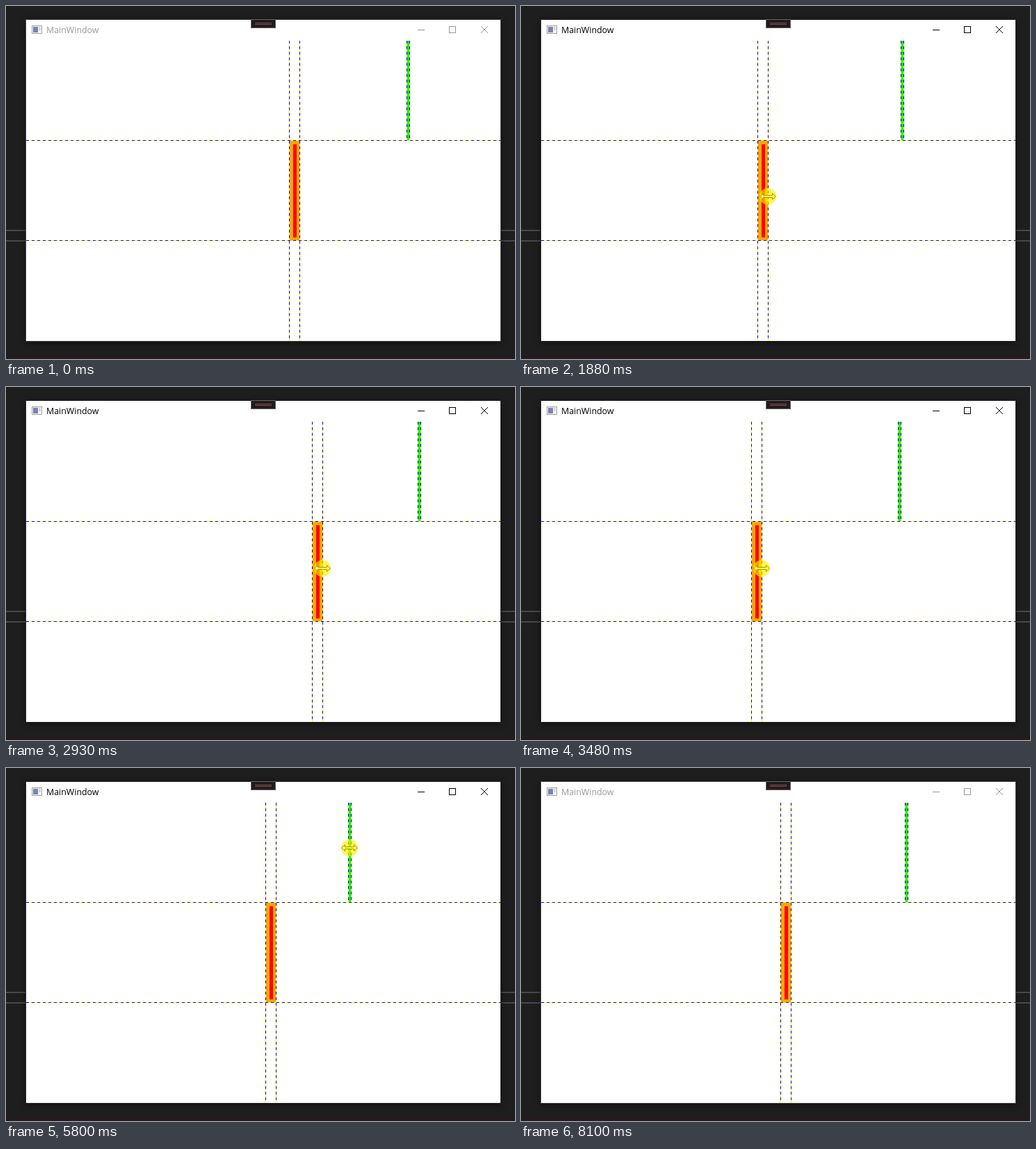
Write an HTML page that moves like this. It is 732x508 px and loops after 8.17 s.

```html
<!DOCTYPE html>
<html lang="en">
<head>
<meta charset="utf-8">
<title>Grid splitters</title>
<style>
  html, body { margin: 0; width: 100%; height: 100%; overflow: hidden; background: #1e1e1e; }
  svg { display: block; width: 732px; height: 508px; }
  .shadow { filter: drop-shadow(0 2px 5px rgba(0, 0, 0, .6)); }
  .title { font: 12.4px "Open Sans", "Noto Sans", sans-serif; }
  .chrome { --ink: #999; --border: #444; }
  .chrome.active { --ink: #000; --border: #262626; }
  .chrome text { fill: var(--ink); }
  .chrome path { stroke: var(--ink); fill: none; }
  .border { stroke: var(--border); fill: none; }
  .gap { stroke: #ff0; }
  .dash { stroke: #00f; stroke-dasharray: 4 4; }
</style>
</head>
<body>
<svg viewBox="0 0 732 508">
  <rect width="732" height="508" fill="#1e1e1e"/>
  <rect y="504" width="732" height="4" fill="#241a1f"/>
  <path d="M0 323H732M0 338H732" stroke="#484848" stroke-width="2"/>
  <rect class="shadow" x="29" y="20" width="682" height="462" fill="#fff"/>

  <g id="chrome" class="chrome">
    <rect class="border" x="28.5" y="19.5" width="683" height="463"/>
    <rect x="37.5" y="28.5" width="14" height="11" fill="#f4f4f4" stroke="#a0a0a0"/>
    <rect x="39" y="30" width="7" height="8" fill="#7d80b0"/>
    <rect x="47" y="30" width="3" height="5" fill="#d4d8e4"/>
    <text class="title" x="58" y="39">MainWindow</text>
    <path d="M592 34.5H602M637.5 29.5h9v9h-9z" shape-rendering="crispEdges"/>
    <path d="M683 29l10 10M693 29l-10 10"/>
  </g>
  <rect x="352.5" y="19.5" width="35" height="12" fill="#1f1b1d" stroke="#6b6468"/>
  <path d="M358 24.5H382M358 26.5H382" stroke="#8a4a4e"/>

  <g shape-rendering="crispEdges">
    <g id="green">
      <rect y="50" width="5" height="144" fill="#0f0"/>
      <path class="gap" d="M.5 50V194M4.5 50V194"/>
      <path class="dash" d="M.5 50V194M4.5 50V194"/>
    </g>
    <g id="red">
      <rect y="194" width="15" height="144" fill="#ffa500"/>
      <rect x="5" y="199" width="5" height="134" fill="#f00"/>
      <path class="gap" d="M-.5 50V482M14.5 50V482"/>
      <path class="dash" d="M-.5 50V482M14.5 50V482"/>
    </g>
    <path class="gap" d="M29 193.5H711M29 337.5H711"/>
    <path class="dash" d="M29 193.5H711M29 337.5H711"/>
  </g>

  <g id="cursor">
    <path id="arrow" d="M.5 .5V16.5L4.2 13L6.8 18.5L9.3 17.4L6.8 12H11.5Z" fill="#fff" stroke="#000"/>
    <path id="resize" d="M-11.5 0L-6.5 -4.5V-1.5H6.5V-4.5L11.5 0L6.5 4.5V1.5H-6.5V4.5Z" fill="#fff" stroke="#000"/>
    <circle id="press" r="12" fill="#fff000" fill-opacity=".65"/>
  </g>
</svg>
<script>
const LOOP = 8170, STEP = 70;
const RED_DRAG = [1670, 4220], GREEN_DRAG = [4960, 7280];
const GREEN_SHARE = .542;

// Pointer gestures: start, end, then the points reached at even intervals.
// Equal start and end make a jump.
let last;
const gestures = [
  [0, 0, [669, 495]],
  [130, 870, [386, 309], [422, 284]],
  [1070, 1070, [429, 282]],
  [1070, 1340, [422, 280]],
  [1670, 2230, [204, 260]],
  [2430, 2930, [455, 261]],
  [3130, 3890, [344, 261], [388, 261]],
  [4220, 4560, [563, 112]],
  [4960, 5230, [626, 113]],
  [5450, 6200, [480, 115], [520, 115], [554, 117]],
  [6270, 6550, [600, 118]],
  [6740, 6950, [554, 119]],
  [7280, 7770, [712, 515]]
].map(([start, end, ...stops]) => {
  const points = last ? [last, ...stops] : stops;
  last = stops.at(-1);
  return { start, end, points };
});

const $ = id => document.getElementById(id);
const [chrome, green, red, cursor, arrow, resize, press] =
  ["chrome", "green", "red", "cursor", "arrow", "resize", "press"].map($);

const show = (el, on) => el.setAttribute("visibility", on ? "visible" : "hidden");
const move = (el, x, y = 0) => el.setAttribute("transform", `translate(${x} ${y})`);
const within = (t, [from, to]) => t >= from && t < to;
const clamp = (t, [from, to]) => Math.min(to, Math.max(from, t));
const ease = k => (1 - Math.cos(Math.PI * k)) / 2;

function pointerAt(t) {
  const { start, end, points } = gestures.findLast(g => g.start <= t);
  if (t >= end) return points.at(-1);
  const elapsed = Math.floor((t - start) / STEP) * STEP;
  const progress = elapsed / (end - start) * (points.length - 1);
  const leg = Math.floor(progress), k = ease(progress - leg);
  const [a, b] = points.slice(leg);
  return a.map((v, axis) => Math.round(v + (b[axis] - v) * k));
}

const dragX = (t, drag) => pointerAt(clamp(t, drag))[0];

function render(now) {
  const t = now % LOOP;
  const [x, y] = pointerAt(t);
  const redX = dragX(t, RED_DRAG) - 14;
  const right = redX + 15;
  const greenX = t < GREEN_DRAG[0]
    ? Math.round(right + (711 - right - 5) * GREEN_SHARE)
    : dragX(t, GREEN_DRAG) - 2;

  const pressed = within(t, RED_DRAG) || within(t, GREEN_DRAG);
  const overRed = x >= redX && x <= right && y >= 194 && y < 338;
  const overGreen = Math.abs(x - greenX - 2) <= 3 && y < 194;
  const sizing = pressed || overRed || overGreen;
  const visible = within(t, [130, 7770]);

  chrome.classList.toggle("active", within(t, [1670, 8100]));
  move(red, redX);
  move(green, greenX);
  move(cursor, x, y);
  show(arrow, visible && !sizing);
  show(resize, visible && sizing);
  show(press, pressed);
}

const start = performance.now();
function tick() {
  render(performance.now() - start);
  requestAnimationFrame(tick);
}
tick();
</script>
</body>
</html>
```
